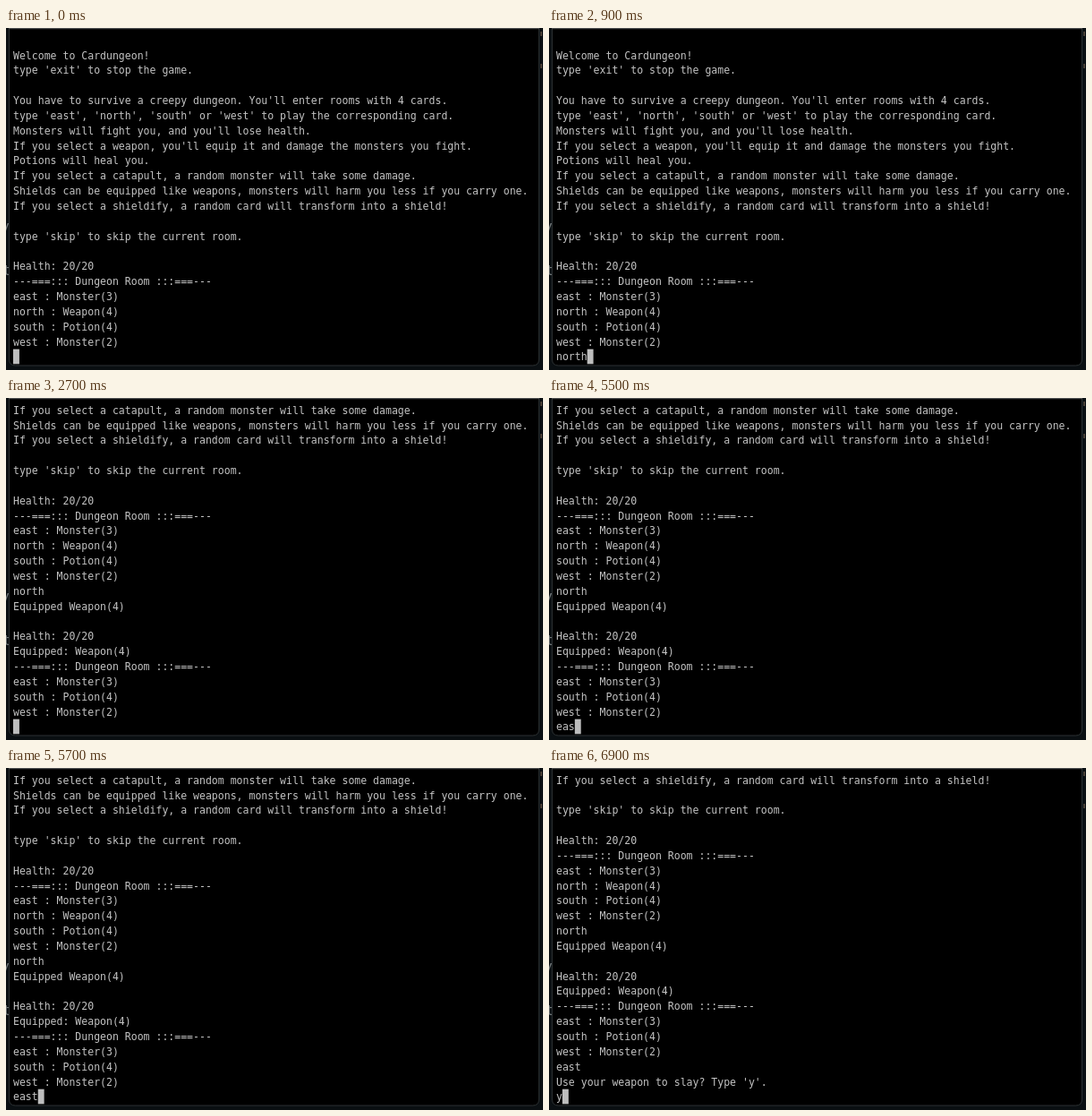
Animation, 600 px wide and 382 px high, one loop 8000 ms. Source, as an HTML page:

```html
<!DOCTYPE html>
<html lang="en">
<head>
<meta charset="utf-8">
<title>Terminal card game</title>
<style>
html, body { margin: 0; width: 100%; height: 100%; overflow: hidden; background: #0a0f12; }
svg { display: block; width: 100%; height: 100%; }
text { white-space: pre; }
#screen { font: 11.52px "DejaVu Sans Mono", monospace; fill: #c3c3c3; }
</style>
</head>
<body>
<svg viewBox="0 0 600 382">
  <rect width="600" height="382" fill="#0a0f12"/>
  <g fill="#747a7c" font-family="Noto Sans, sans-serif" font-size="16">
    <text x="-5" y="227">v</text>
    <text x="-2" y="276">t</text>
  </g>
  <g fill="#4a4036">
    <rect x="597" y="4" width="2" height="5"/>
    <rect x="597" y="40" width="2" height="5"/>
  </g>
  <path d="M3.5 0V370Q3.5 377 10.5 377H588.5Q595.5 377 595.5 370V0Z" fill="#000" stroke="#2c3133"/>
  <rect x="3" width="593" height="1.2" fill="#4b4d4e"/>
  <g id="screen"></g>
  <rect id="cursor" y="358.7" width="6.9" height="16.6" fill="#bdbdbd"/>
</svg>
<script>
const LOOP = 8000, ROWS = 22, LEFT = 8, BASE = 17.7, LINE = 16.84, CELL = 6.935;

const room = "---===::: Dungeon Room :::===---";
const east = "east : Monster(3)";
const south = "south : Potion(4)";
const west = "west : Monster(2)";
const health = "Health: 20/20";

const log = [
  "",
  "Welcome to Cardungeon!",
  "type 'exit' to stop the game.",
  "",
  "You have to survive a creepy dungeon. You'll enter rooms with 4 cards.",
  "type 'east', 'north', 'south' or 'west' to play the corresponding card.",
  "Monsters will fight you, and you'll lose health.",
  "If you select a weapon, you'll equip it and damage the monsters you fight.",
  "Potions will heal you.",
  "If you select a catapult, a random monster will take some damage.",
  "Shields can be equipped like weapons, monsters will harm you less if you carry one.",
  "If you select a shieldify, a random card will transform into a shield!",
  "",
  "type 'skip' to skip the current room.",
  "",
  health, room, east, "north : Weapon(4)", south, west,
  "north",
  "Equipped Weapon(4)",
  "",
  health, "Equipped: Weapon(4)", room, east, south, west,
  "east",
  "Use your weapon to slay? Type 'y'."
];

// start time, first visible log line, typed input
const steps = [
  [0, 0, ""], [500, 0, "no"], [700, 0, "nor"], [900, 0, "north"],
  [2700, 9, ""], [4900, 9, "e"], [5500, 9, "eas"], [5700, 9, "east"],
  [6100, 11, ""], [6900, 11, "y"]
];

const screen = document.getElementById("screen");
const cursor = document.getElementById("cursor");
const rows = Array.from({ length: ROWS }, (_, i) => {
  const row = document.createElementNS("http://www.w3.org/2000/svg", "text");
  row.setAttribute("x", LEFT);
  row.setAttribute("y", BASE + i * LINE);
  return screen.appendChild(row);
});

let shown = null;

function draw(time) {
  const step = steps.findLast(s => s[0] <= time);
  if (step === shown) return;
  shown = step;
  const [, top, typed] = step;
  rows.forEach((row, i) => {
    row.textContent = i === ROWS - 1 ? typed : log[top + i];
  });
  cursor.setAttribute("x", LEFT + typed.length * CELL);
}

const start = performance.now();
function tick() {
  draw((performance.now() - start) % LOOP);
  requestAnimationFrame(tick);
}
tick();
</script>
</body>
</html>
```
